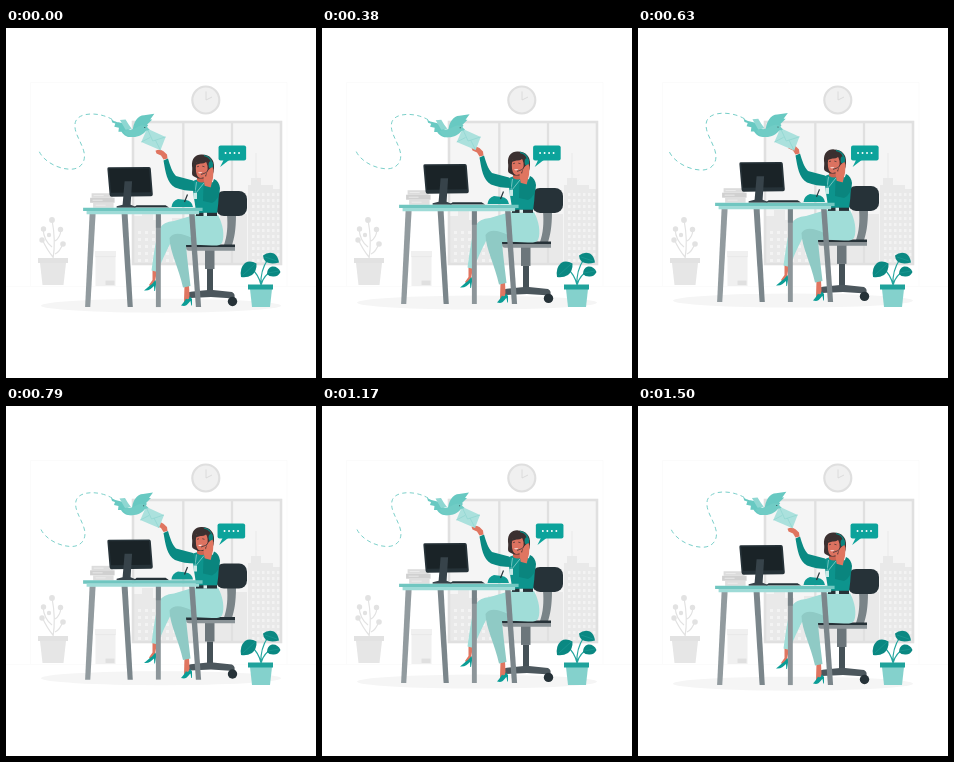
An HTML page that plays this animation: 310x350 px, repeating every 1.54 s.

```html
<!DOCTYPE html>
<html lang="en">
<head>
<meta charset="utf-8">
<title>Support desk</title>
<style>
  html, body { margin: 0; width: 100%; height: 100%; overflow: hidden; background: #fff; }
  svg { display: block; width: 100vw; height: 100vh; }
</style>
</head>
<body>
<svg viewBox="0 0 310 350" xmlns="http://www.w3.org/2000/svg" fill="none">
  <!-- room -->
  <g stroke="#fafafa" stroke-width=".8">
    <path d="M24.500 258V54.500H150.500M152 54.500H281V258M0 258.500H310"/>
  </g>
  <ellipse id="shadow" cx="155" cy="277.700" rx="120" ry="7" fill="#f5f5f5"/>
  <path d="M127 94H275V236H127Z" fill="#f5f5f5"/>
  <g id="city" fill="#e9e9e9">
    <path d="M128 236V188H136V182H147V192H156V200H166V190H177V236Z"/>
    <path d="M178 236V196H190V186H204V200H214V180H226V236Z"/>
    <path d="M227 236V186H241V236ZM242 236V157H245V150H249.500V125H250.500V150H255V157H267V161H274V236Z"/>
  </g>
  <g stroke="#e0e0e0" stroke-width="2.600">
    <rect x="127" y="94" width="148" height="142"/>
    <path d="M177.300 94V236M226 94V236" stroke-width="2.300"/>
  </g>
  <circle cx="199.800" cy="72" r="13.500" fill="#f0f0f0" stroke="#dfdfdf" stroke-width="2.200"/>
  <path d="M200 63.500V72L206 69" stroke="#d9d9d9" stroke-width=".9"/>
  <!-- grey plant and bin -->
  <g stroke="#e2e2e2" stroke-width="1.200">
    <path d="M47 231Q50 212 46 192M47 229Q41 222 36 211M46 219Q38 213 37 201M49 226Q54 224 57 215M49 213Q54 210 55 202"/>
  </g>
  <g fill="#e2e2e2">
    <circle cx="46" cy="192" r="2.900"/><circle cx="37.500" cy="201" r="2.700"/><circle cx="54.500" cy="201.500" r="2.700"/>
    <circle cx="36" cy="212" r="2.700"/><circle cx="57" cy="216" r="2.800"/><circle cx="43" cy="207" r="2.200"/>
    <path d="M32 230H62V235H32Z"/>
  </g>
  <path d="M34 235H60L57.500 257H36.500Z" fill="#e6e6e6"/>
  <path d="M89 223H110V229H109.500V258H89.500V229H89Z" fill="#f0f0f0"/>
  <path d="M89.500 228.600H109.500" stroke="#e6e6e6" stroke-width=".8"/>
  <path d="M99.500 252.500H108.500V257H99.500Z" fill="#e0e0e0"/>

  <!-- desk, chair and person -->
  <g id="float">
    <path d="M221 186H230C230 203 228 211 226 217H218C221 208 222 199 221 186Z" fill="#7a8488"/>
    <rect x="210" y="163" width="31" height="25" rx="8" fill="#263238"/>
    <path d="M199 221H208.500V241H199Z" fill="#6c767b"/>
    <path d="M201 241H207V264H201Z" fill="#455157"/>
    <path d="M181 266.500Q182 263.500 187 263.500L202 262H207L226 264Q230 266 228 270.500L205 269L184 270Q181 270 181 266.500Z" fill="#4c575d"/>
    <circle cx="226.500" cy="273.500" r="4.700" fill="#263238"/>
    <path d="M179 216.500H229V219.500H180Z" fill="#263238"/>
    <path d="M180 219.500H229V222.800H183Q180 222.800 180 219.500Z" fill="#8b9498"/>

    <!-- legs -->
    <path d="M146.500 241L151 242L149 254L145 259L143 257L146.500 252Z" fill="#e07560"/>
    <path d="M138 262.500C141 260.500 143.500 257 146 256L149.500 252L150.300 255L149 263H148.300L148 258C145 261 143 263 138 262.500Z" fill="#0b9d96"/>
    <path d="M188 187H212C217 196 219 208 216 215Q214 218 206 217.500L172 216L165 214C160 224 155 234 151.800 244L145.500 242.500C148 226 149 213 154 200Q157 194 168 193Z" fill="#a0ddd8"/>
    <path d="M178.500 257H183L183.500 268L182 274L178 274Z" fill="#e07560"/>
    <path d="M175 277.500C177 275 179 273 180 270.500Q182 273 184 268.500L186 271V277.500H185.300L184.500 273C182 275 181 278 178 278Z" fill="#0b9d96"/>
    <path d="M163.500 210C168 203 177 206 186 210L190 217L180 217C181 231 183 244 184.500 258L177 259.500C173 240 164 225 163.500 210Z" fill="#8fcac5"/>

    <!-- body -->
    <path d="M187 153C194 150 202 150 206 154L212 157Q214 165 211 186H190C190 177 186 165 187 153Z" fill="#0d948d"/>
    <path d="M190 184.800H211V188H190Z" fill="#263238"/>
    <path d="M197.500 184.800H201V188H197.500Z" fill="#d7f0ee"/>
    <path d="M191 147H200L201 153Q196 156 191 153Z" fill="#cc6351"/>
    <path d="M190.500 154L189 165M198 155L190 165" stroke="#d7f0ee" stroke-width=".5"/>
    <path d="M187.500 165H191V171H187.500Z" fill="#c7e9e6"/>
    <path d="M157.500 132.500L162 130.500C164 137 166 144 170 148L187 152.500L189.500 163Q178 163 169 159.500C161 155 159.500 144 157.500 132.500Z" fill="#0a8a83"/>
    <path d="M149.500 122.800Q153 120.500 157.500 123.200L161 126.500L161.500 130.500L157.500 131.500L155 127.500L150.500 125.500Z" fill="#e07560"/>

    <!-- head -->
    <path d="M188 148.500C184.500 147 187 143 186 138C185.500 130 190 126 196 126.500C204 126.500 208.500 132 208 139C208 146 206 150 201 150.500L192 150.500Z" fill="#3b3030"/>
    <path d="M190.500 134Q196 134 199 132Q203 138 201 144Q199 150 194 150Q189.800 149 189.800 140Z" fill="#dc7260"/>
    <path d="M189.500 137C190 131 197 129 201.500 131.500Q200 136 194.500 135.500Z" fill="#3b3030"/>
    <path d="M191 138.800L193 138.200M196.300 138.200L198.500 138.800" stroke="#3b3030" stroke-width=".7"/>
    <path d="M192 144.500Q194.500 146.300 196.500 144.300Z" fill="#fff"/>
    <path d="M198 127.500Q206.500 129 206.500 139" stroke="#0a847e" stroke-width="1.200"/>
    <ellipse cx="204.800" cy="137" rx="2.200" ry="3.600" fill="#0a847e"/>
    <path d="M203.500 141Q200 146 195 146.500" stroke="#263238" stroke-width=".7"/>
    <path d="M197 147L198.500 146L200 149Q200.500 143 204 140.500L206.500 139L207.500 142L207 150L204.500 160H199Z" fill="#e07560"/>
    <path d="M197.500 157.500L205 159.500L208 151Q213 153 214 160Q214 171 206 175L197 173Z" fill="#0a857e"/>

    <!-- writing pad -->
    <path d="M165.500 179Q166 173 172 171L180 172Q186 173 187 179Z" fill="#109a93"/>
    <path d="M178.500 174L181.500 166.500" stroke="#263238" stroke-width="1.200"/>

    <g transform="translate(-.4 .8)">
      <!-- desk top items -->
      <path d="M86 164.500H107V169H86Z" fill="#dcdcdc"/>
      <path d="M84.500 169H109V174H84.500Z" fill="#d0d0d0"/>
      <path d="M87.500 174H108V179H87.500Z" fill="#dedede"/>
      <path d="M88 166.800H98M87 171.500H97M90 176.500H100" stroke="#efefef" stroke-width=".8"/>
      <path d="M103 138.500L143.500 138.200Q145 138.200 145.200 140L147.200 165.500Q147.200 167.500 145.500 167.500L106 168Q104.300 168 104 166L101.800 140.500Q101.500 138.500 103 138.500Z" fill="#263238"/>
      <path d="M103.500 140L143.500 139.700L145.300 163.500L105.500 164Z" fill="#1a2327"/>
      <path d="M119 152.500H126.500L125 176L130 178V179H111V177.500L117 176Z" fill="#37434a"/>
      <path d="M131 176.500H160L163.500 178.800H128Z" fill="#263238"/>

      <!-- desk -->
      <path d="M84 185H90L84.700 278.300H79.500Z" fill="#929b9f"/>
      <path d="M116 185H122L127.200 278.300H122Z" fill="#7b868b"/>
      <path d="M150.300 185H155.200V278.300H150.300Z" fill="#8d969a"/>
      <path d="M183.500 185H189L195.500 278.300H190.300Z" fill="#7b868b"/>
      <path d="M150.300 185H155.200V199H150.300Z" fill="#778287"/>
      <path d="M77.500 179H197V182.300H77.500Z" fill="#70c6c0"/>
      <path d="M81 182.300H193.500V185.500H81Z" fill="#9edbd7"/>
    </g>
  </g>

  <!-- bird -->
  <g id="bird">
    <path d="M35 123.500C39 132 52 140.500 66 140.500C77 140 81 131 78 122C75 112 68 104 70 95C72 87 84 85.500 94 87.500Q101 89 106 92"
      stroke="#5cc4bd" stroke-width=".8" stroke-dasharray="4.200 3.300"/>
    <path d="M140 100.800L158 109L153 122L134.300 114Z" fill="#abe1dd"/>
    <path d="M140 100.800L145.500 113L158 109M134.300 114L143 109.500M153 122L148 112" stroke="#8fd5d0" stroke-width=".7"/>
    <path d="M126 104C126 95 131 88 137 88L147 86.500L143 92L145 92L140 97L141 98L136 103L133 107Z" fill="#68c9c2"/>
    <path d="M105 91.500C111 97 116 92 121 101L130 105L126 109C120 110 117 107 115 104L112 104L112.500 100L108 99L109 96L106 95Z" fill="#68c9c2"/>
    <path d="M113.500 92.500L119 92L122 97L125 101L119 102Z" fill="#8fd7d2"/>
    <path d="M117 103C124 102 128 101 131 99C136 96.500 140 98 140.500 100L142.500 102L139 103C136 107 130 110 124 109Q119 108 117 103Z" fill="#70ccc5"/>
    <circle cx="137.700" cy="99.800" r=".5" fill="#263238"/>
  </g>

  <!-- speech bubble -->
  <g id="bubble" fill="#0ca39b">
    <rect x="212.700" y="117.500" width="27.600" height="15" rx="2"/>
    <path d="M218 131.500L214.300 139L224 131.500Z"/>
    <g fill="#fff">
      <circle cx="219.700" cy="125" r=".95"/><circle cx="224.200" cy="125" r=".95"/>
      <circle cx="228.700" cy="125" r=".95"/><circle cx="233.200" cy="125" r=".95"/>
    </g>
  </g>

  <!-- green plant -->
  <path d="M255 257Q254 243 262 231M255 257Q253 247 245 240M255 257Q258 246 267 243" stroke="#22a59e" stroke-width="1.200"/>
  <g fill="#0a8882">
    <path d="M257 227.500Q262 223.500 268 225.500Q272 228 273 234.500Q265 236.500 260 234Q257 231 257 227.500Z"/>
    <path d="M235 249Q233.500 240 239 235Q244 232 250.500 235.500Q251 243 246 247Q241 250 235 249Z"/>
    <path d="M261 246Q261 240 266 238.500Q272 238 274.500 244Q272 249 267 248.500Q263 248.500 261 246Z"/>
  </g>
  <path d="M237 247L249 236M259 229L271 233M262 245L273 243" stroke="#2fa8a1" stroke-width=".4"/>
  <path d="M244 261H266L264 279H246Z" fill="#84d1cc"/>
  <path d="M242 256.500H267V261.500H242Z" fill="#1fa29b"/>
</svg>
<script>
  const LOOP = 1540, CYCLE = 1500, LEAD = 40, FPS = 24;
  const bird = document.getElementById("bird");
  const bubble = document.getElementById("bubble");
  const risers = ["float", "shadow"].map(id => document.getElementById(id));

  // Keyframes are [percent, value] pairs joined by straight lines.
  const rise = [[0, 0], [50, -6.1], [100, 0]];
  const beat = [[0, 1], [10, 1.1], [30, 1], [40, 1.1], [50, 1], [100, 1]];
  const shake = [[0, 0], [10, -.62], [20, 1.24], [30, -2.48], [40, 2.48], [50, -2.48],
    [60, 2.48], [70, -2.48], [80, 1.24], [90, -.62], [100, 0]];

  function at(keys, pos) {
    const i = Math.max(1, keys.findIndex(k => k[0] >= pos));
    const [x0, y0] = keys[i - 1], [x1, y1] = keys[i];
    return y0 + (y1 - y0) * (pos - x0) / (x1 - x0);
  }

  function addWindows() {
    let d = "";
    for (let y = 165; y < 232; y += 6)
      for (let x = 246; x < 272; x += 5) d += `M${x} ${y}h2.500v3h-2.500z`;
    for (let y = 203; y < 232; y += 7)
      for (let x = 132; x < 174; x += 7) d += `M${x} ${y}h3v3h-3z`;
    const path = document.createElementNS("http://www.w3.org/2000/svg", "path");
    path.setAttribute("d", d);
    path.setAttribute("fill", "#f3f3f3");
    document.getElementById("city").append(path);
  }

  function draw(ms) {
    const step = Math.floor((ms % LOOP) * FPS / 1000);
    const pos = (step * 1000 / FPS + LEAD) % CYCLE / CYCLE * 100;
    for (const part of risers) part.setAttribute("transform", `translate(0 ${at(rise, pos) + .3})`);
    bubble.setAttribute("transform", `translate(${at(shake, pos)} 0)`);
    bird.setAttribute("transform", `translate(97 113) scale(${at(beat, pos)}) translate(-97 -113)`);
  }

  let start;
  function tick(now) {
    start ??= now;
    draw(now - start);
    requestAnimationFrame(tick);
  }

  addWindows();
  draw(0);
  requestAnimationFrame(tick);
</script>
</body>
</html>
```
